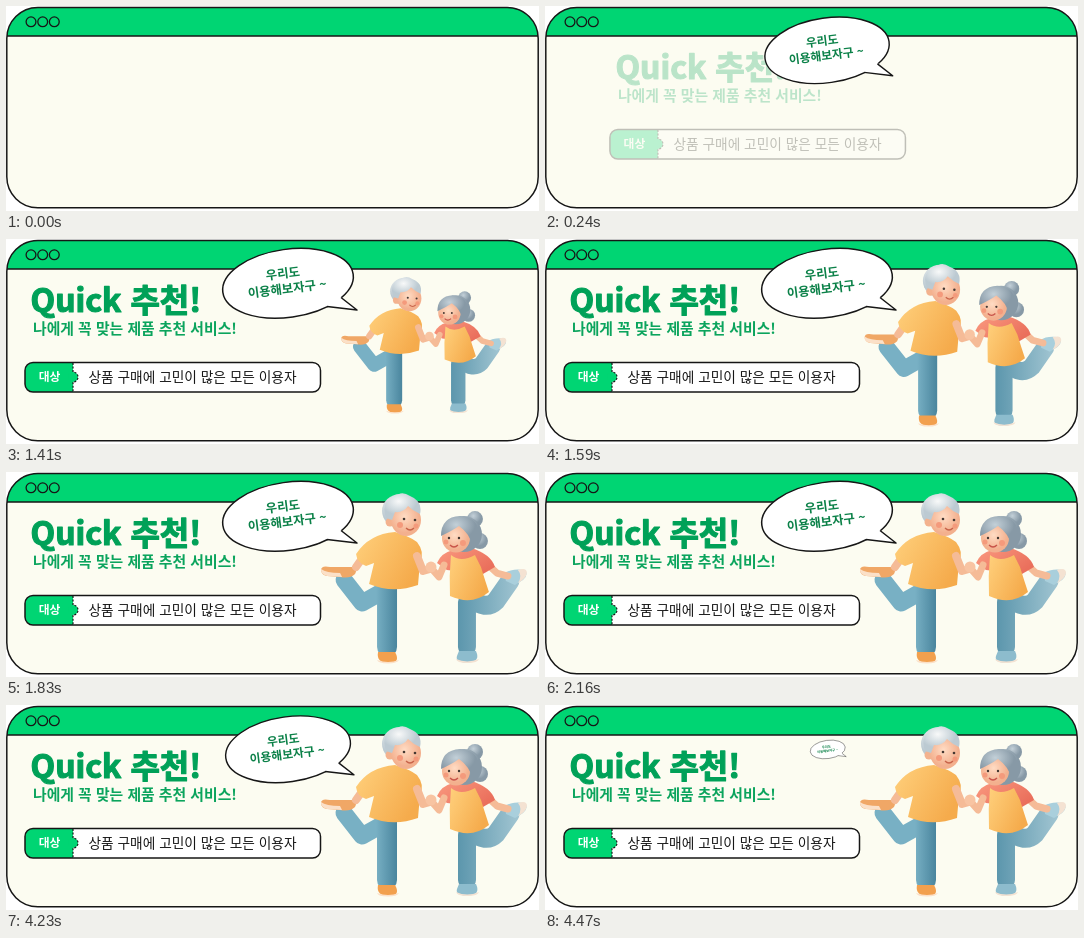
Animation of 533x205 px, one loop 4500 ms. Source, as an HTML page:

```html
<!DOCTYPE html>
<html lang="ko">
<head>
<meta charset="utf-8">
<title>Quick 추천!</title>
<style>
  html, body { margin: 0; width: 100%; height: 100%; overflow: hidden; background: #fff; }
  svg { display: block; width: 100vw; height: 100vh; }
  text { font-family: "Noto Sans CJK KR", "Noto Sans CJK", sans-serif; }
  .ink { stroke: #161616; stroke-width: 1.5; }
  .limb { fill: none; stroke-linecap: round; stroke-linejoin: round; }
</style>
</head>
<body>
<svg viewBox="0 0 533 205" preserveAspectRatio="none">
  <defs>
    <clipPath id="frame"><rect x=".8" y="1.5" width="531.4" height="200.3" rx="31"/></clipPath>
    <clipPath id="label"><rect x="19" y="123.5" width="48" height="29.5"/></clipPath>
    <linearGradient id="shirt" x2="1" y2=".5">
      <stop stop-color="#ffd07c"/><stop offset="1" stop-color="#f5ab4c"/>
    </linearGradient>
    <linearGradient id="coral" x2="1" y2=".6">
      <stop stop-color="#fa9a80"/><stop offset="1" stop-color="#ea6f5c"/>
    </linearGradient>
    <linearGradient id="denim" gradientUnits="userSpaceOnUse" x1="370" y1="0" x2="394" y2="0">
      <stop stop-color="#78b0c4"/><stop offset="1" stop-color="#437f98"/>
    </linearGradient>
    <linearGradient id="jeans" gradientUnits="userSpaceOnUse" x1="448" y1="0" x2="510" y2="0">
      <stop stop-color="#5793aa"/><stop offset="1" stop-color="#9ec3d0"/>
    </linearGradient>
    <radialGradient id="skin" cx=".45" cy=".4">
      <stop stop-color="#ffdcc4"/><stop offset="1" stop-color="#f3b08e"/>
    </radialGradient>
    <radialGradient id="white" cx=".4" cy=".3">
      <stop stop-color="#f8f9f9"/><stop offset="1" stop-color="#bccad2"/>
    </radialGradient>
    <radialGradient id="gray" cx=".4" cy=".3">
      <stop stop-color="#c3d0d8"/><stop offset="1" stop-color="#8799a6"/>
    </radialGradient>
  </defs>

  <g clip-path="url(#frame)">
    <rect width="533" height="205" fill="#fcfcf1"/>
    <rect width="533" height="30" fill="#00d573"/>
    <path class="ink" d="M0 30H533"/>
  </g>
  <rect class="ink" x=".8" y="1.5" width="531.4" height="200.3" rx="31" fill="none"/>
  <g class="ink" fill="none" style="stroke-width:1.3">
    <circle cx="25" cy="15.8" r="4.9"/><circle cx="36.7" cy="15.8" r="4.9"/><circle cx="48.3" cy="15.8" r="4.9"/>
  </g>

  <g id="copy">
    <text x="24.5" y="73" font-size="32" font-weight="900" fill="#00a158" stroke="#00a158" stroke-width="1.2" stroke-linejoin="round">Quick 추천!</text>
    <text x="27" y="94.5" font-size="14.85" font-weight="700" fill="#0ba45d">나에게 꼭 맞는 제품 추천 서비스!</text>
    <rect x="19" y="123.5" width="295.5" height="29.5" rx="8" fill="#fff"/>
    <rect x="19" y="123.5" width="60" height="29.5" rx="8" fill="#00d573" clip-path="url(#label)"/>
    <circle cx="67" cy="138" r="5" fill="#00d573"/>
    <path d="M67 124V133A5 5 0 0 1 67 143V153" fill="none" stroke="#161616" stroke-width="1.2" stroke-dasharray="2 1.5"/>
    <rect class="ink" x="19" y="123.5" width="295.5" height="29.5" rx="8" fill="none"/>
    <text x="43.5" y="142.3" font-size="11.8" font-weight="700" fill="#fff" text-anchor="middle">대상</text>
    <text x="82.5" y="142.7" font-size="13.7" font-weight="500" fill="#161616">상품 구매에 고민이 많은 모든 이용자</text>
  </g>

  <g id="couple">
    <!-- man -->
    <path class="limb" d="M381 117L356 131L338 108" stroke="url(#denim)" stroke-width="17"/>
    <path d="M315 98Q315 93 324 95L346 95Q352 97 349 102Q344 107 334 105L321 104Q315 103 315 98Z" fill="#f0a766"/>
    <path d="M315 97Q320 101 334 101L336 105L321 104Q314 102 315 97Z" fill="#fbe0c8"/>
    <path class="limb" d="M381 114V175" stroke="url(#denim)" stroke-width="20"/>
    <path d="M372 180H389Q395 191 383 191Q370 191 372 180Z" fill="#f2a04e"/>
    <path d="M371 188Q382 192 393 188Q391 191.5 382 191.5Q372 191.5 371 188Z" fill="#fbe0c8"/>
    <path class="limb" d="M362 78L350 95" stroke="#f5bb97" stroke-width="8"/>
    <path d="M389 60Q363 62 350 82Q351 91 360 94L368 91L363 112Q387 122 412 113L414 90Q419 80 411 70Q403 64 389 60Z" fill="url(#shirt)"/>
    <path class="limb" d="M411 84L417 99L424 97" stroke="#f5bb97" stroke-width="8"/>
    <ellipse cx="394" cy="39" rx="18" ry="17" fill="url(#white)"/>
    <circle cx="384" cy="50" r="4.5" fill="#f3b28e"/>
    <ellipse cx="400" cy="48" rx="15" ry="16" fill="url(#skin)"/>
    <path d="M380 46Q374 29 389 25Q395 18 404 24Q417 29 414 42Q407 39 402 34Q397 41 389 40L386 48Z" fill="url(#white)"/>
    <circle cx="394" cy="53" r="3" fill="#f49a7c"/><circle cx="410" cy="54" r="2.5" fill="#f49a7c"/>
    <circle cx="398" cy="47" r="1.3" fill="#443832"/><circle cx="409" cy="48" r="1.3" fill="#443832"/>
    <path d="M400 56Q404 60 408 56" fill="none" stroke="#c8644a" stroke-width="1.3"/>

    <!-- woman -->
    <path class="limb" d="M461 130V175" stroke="url(#jeans)" stroke-width="18"/>
    <path class="limb" d="M464 126Q480 139 490 129L504 109" stroke="url(#jeans)" stroke-width="19"/>
    <path d="M499 101Q506 96 519 98Q523 103 517 108L509 113L500 109Z" fill="#a9cfdc"/>
    <path d="M512 98Q521 95 521 101Q520 107 512 111Q517 104 512 98Z" fill="#f4e2d2"/>
    <path d="M453 179H470Q475 190 462 190.5Q449 191 451 184Z" fill="#8dbccd"/>
    <path d="M450 187Q461 192 473 187Q472 191 461 191Q451 191 450 187Z" fill="#f4e2d2"/>
    <path class="limb" d="M477 88L491 101L502 104" stroke="#f5bb97" stroke-width="7"/>
    <path d="M447 78Q435 81 431 91L441 98L477 102L489 95Q485 82 465 76Z" fill="url(#coral)"/>
    <path d="M445 83Q455 91 469 83L475 95Q479 108 483 120Q466 134 444 124Q443 104 445 83Z" fill="url(#shirt)"/>
    <path class="limb" d="M438 93L433 105L426 97" stroke="#f5bb97" stroke-width="7"/>
    <circle cx="469" cy="47" r="8" fill="url(#gray)"/>
    <circle cx="474" cy="69" r="8" fill="url(#gray)"/>
    <circle cx="458" cy="62" r="18" fill="url(#gray)"/>
    <ellipse cx="450" cy="66" rx="14" ry="14.5" fill="url(#skin)"/>
    <path d="M435 64Q435 45 454 44Q471 45 473 60Q471 71 466 73Q464 62 453 54Q446 59 435 64Z" fill="url(#gray)"/>
    <circle cx="457" cy="71" r="3" fill="#f49a7c"/><circle cx="440" cy="70" r="2.5" fill="#f49a7c"/>
    <circle cx="443" cy="66" r="1.2" fill="#443832"/><circle cx="453" cy="66" r="1.2" fill="#443832"/>
    <path d="M444 73Q448 77 452 73" fill="none" stroke="#c8544a" stroke-width="1.3"/>
    <circle cx="425" cy="95" r="5.5" fill="#f8c4a2"/>
  </g>

  <g id="bubble">
    <ellipse class="ink" cx="282" cy="44.3" rx="65.8" ry="34" transform="rotate(-8 282 44.3)" fill="#fff"/>
    <path d="M335 58L351 71L321 67L318 62L331 56Z" fill="#fff"/>
    <path class="ink" d="M335 58.5L351 71L321 67.5" fill="none" stroke-linejoin="round"/>
    <g transform="rotate(-7 281 44)" fill="#0b8148" font-weight="700" font-size="12.4" text-anchor="middle">
      <text x="278" y="38.5">우리도</text>
      <text x="280.5" y="54">이용해보자구 ~</text>
    </g>
  </g>
</svg>
<script>
  const LOOP = 4500, STEP = 30;
  const [copy, couple, bubble] = ['copy', 'couple', 'bubble'].map(id => document.getElementById(id));

  const spring = ms => ms <= 0 ? 0 : 1 - Math.exp(-.012 * ms) * Math.cos(.024 * ms);
  const smooth = (t, from, to) => {
    const x = Math.min(1, Math.max(0, (t - from) / (to - from)));
    return x * x * (3 - 2 * x);
  };
  const scaleAbout = (el, x, y, s) => {
    el.style.visibility = s > 0 ? 'visible' : 'hidden';
    el.setAttribute('transform', `translate(${x} ${y}) scale(${s}) translate(${-x} ${-y})`);
  };

  function draw(t) {
    const slide = smooth(t, 60, 600);
    copy.setAttribute('transform', `translate(${62 * (1 - slide)} 0)`);
    copy.setAttribute('opacity', slide);
    // The bubble leaves by playing its entrance backwards.
    scaleAbout(bubble, 283, 44.5, spring(t < LOOP / 2 ? t : 4488 - t));
    scaleAbout(couple, 417, 106, spring(t - 1360));
  }

  let start;
  function tick(now) {
    start ??= now;
    const t = (now - start) % LOOP;
    draw(Math.floor(t / STEP) * STEP);
    requestAnimationFrame(tick);
  }
  draw(0);
  requestAnimationFrame(tick);
</script>
</body>
</html>
```
